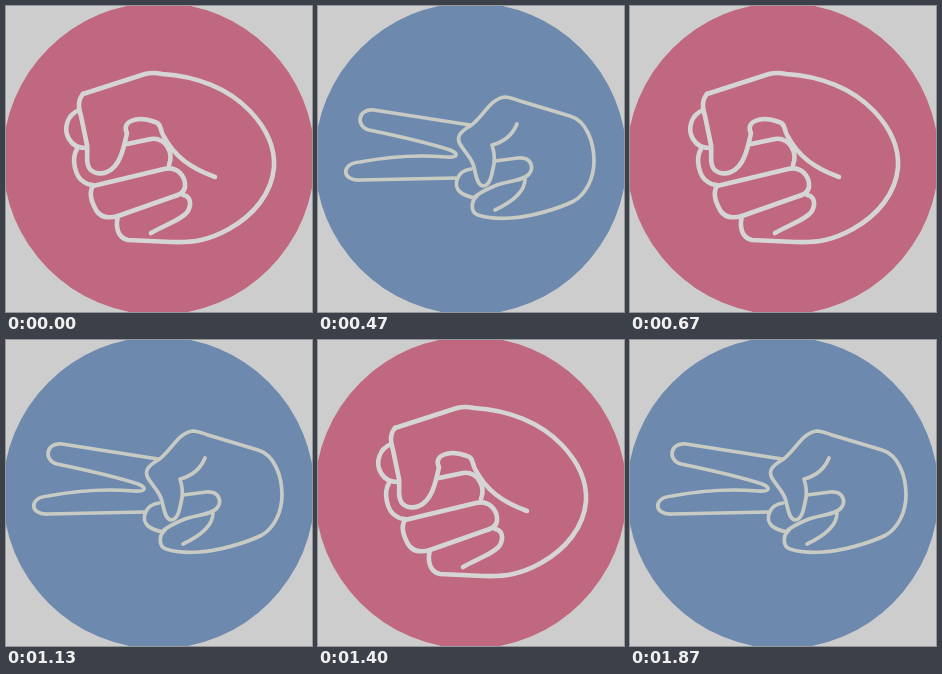
These frames come from a looping animation (306x306 px, 2070 ms). An HTML page:

```html
<!DOCTYPE html>
<html lang="en">
<head>
<meta charset="utf-8">
<title>Rock, paper, scissors</title>
<style>
  html, body { margin: 0; width: 100%; height: 100%; overflow: hidden; background: #cdcdcd; }
  svg { display: block; width: 100vw; height: 100vh; }
  path { fill: none; stroke-linecap: round; stroke-linejoin: round; }
</style>
</head>
<body>
<svg viewBox="0 0 306 306">
  <rect width="306" height="306" fill="#cdcdcd"/>
  <circle id="disc" cx="152.7" cy="152.7" r="156"/>

  <g id="rock" stroke="#d6d5d6" stroke-width="4.6">
    <path d="M77 88 L139 68 Q147 66 156 68 C190 70 222 82 244 105 C262 124 269 143 268 161 C266 187 248 209 223 223 C203 234 188 237 165 236 L122 234 C112 232 109 221 112 210"/>
    <path d="M77 88 C71 95 73 103 75 110 L81 139 C82 147 80 153 82 159 C84 167 93 169 101 166 C113 161 117 146 121 127 C115 116 130 109 149 116 C155 117 154 123 157 129 C168 150 184 162 209 171"/>
    <path d="M73 104 C61 109 57 123 63 133 C67 140 73 142 80 142"/>
    <path d="M71 143 C65 153 69 171 78 176 Q82 179 87 179"/>
    <path d="M121 138 L145 133 C159 131 168 146 163 159"/>
    <path d="M87 180 L158 163 C171 160 180 170 179 181 C178 187 173 189 166 191 L112 210 C101 213 94 211 90 204 C85 195 83 186 87 180"/>
    <path d="M177 189 C184 190 186 197 182 205 C177 213 159 219 145 227"/>
  </g>

  <g id="paper" stroke="#d3d4cf" stroke-width="4">
    <path d="M138 117 L62 110 C45 108 44 127 59 129 L126 136 L43 136 C26 136 26 155 43 156 L126 156 L48 162 C32 164 33 182 50 181 L129 176 L72 188 C57 192 61 208 76 206 L139 196 C157 207 179 214 208 212 C247 208 276 184 276 152 C275 123 259 106 230 102 C211 100 199 92 184 84 L149 67 C134 60 125 76 138 84 L166 105 C160 111 150 116 138 117"/>
    <path d="M166 105 C177 113 185 122 187 135"/>
  </g>

  <g id="scissors" stroke="#c8cac4" stroke-width="3.7">
    <path d="M152 119 L56 104 C40 102 37 120 51 124 C80 130 108 136 132 144 C142 148 139 152 128 151 C104 149 74 150 42 156 C23 157 23 175 42 174 L138 172"/>
    <path d="M152 120 C164 113 172 92 187 91 C192 91 196 93 202 95 L252 110 C269 115 276 137 276 155 C276 172 268 188 256 195 C240 203 212 211 193 212 C180 213 169 212 160 209 C152 206 153 195 159 190"/>
    <path d="M152 120 C142 126 138 131 142 138 C146 145 152 150 155 158 C158 166 158 179 165 180 C173 180 174 166 176 158 C177 150 176 145 174 139 C186 136 194 130 199 118"/>
    <path d="M153 163 C138 165 135 180 142 186 C147 190 152 191 157 192"/>
    <path d="M177 155 L200 152 C214 151 216 162 211 168 C205 175 190 175 179 179 C169 183 160 187 156 192"/>
    <path d="M207 173 C207 186 194 196 177 204"/>
  </g>
</svg>
<script>
const LOOP = 2070;
const cuts = [200, 470, 670, 930, 1130, 1400, 1600, 1870];
const poses = [
  ["rock", "#c0687f"],
  ["paper", "#7aa584"],
  ["scissors", "#6d89ae"]
];
const el = id => document.getElementById(id);

function draw(ms) {
  const t = ms % LOOP;
  const current = cuts.filter(c => t >= c).length % poses.length;
  poses.forEach(([id, color], i) => {
    el(id).style.display = i === current ? "inline" : "none";
    if (i === current) el("disc").setAttribute("fill", color);
  });
}

const start = performance.now();
function tick() {
  draw(performance.now() - start);
  requestAnimationFrame(tick);
}
draw(0);
requestAnimationFrame(tick);
</script>
</body>
</html>
```
